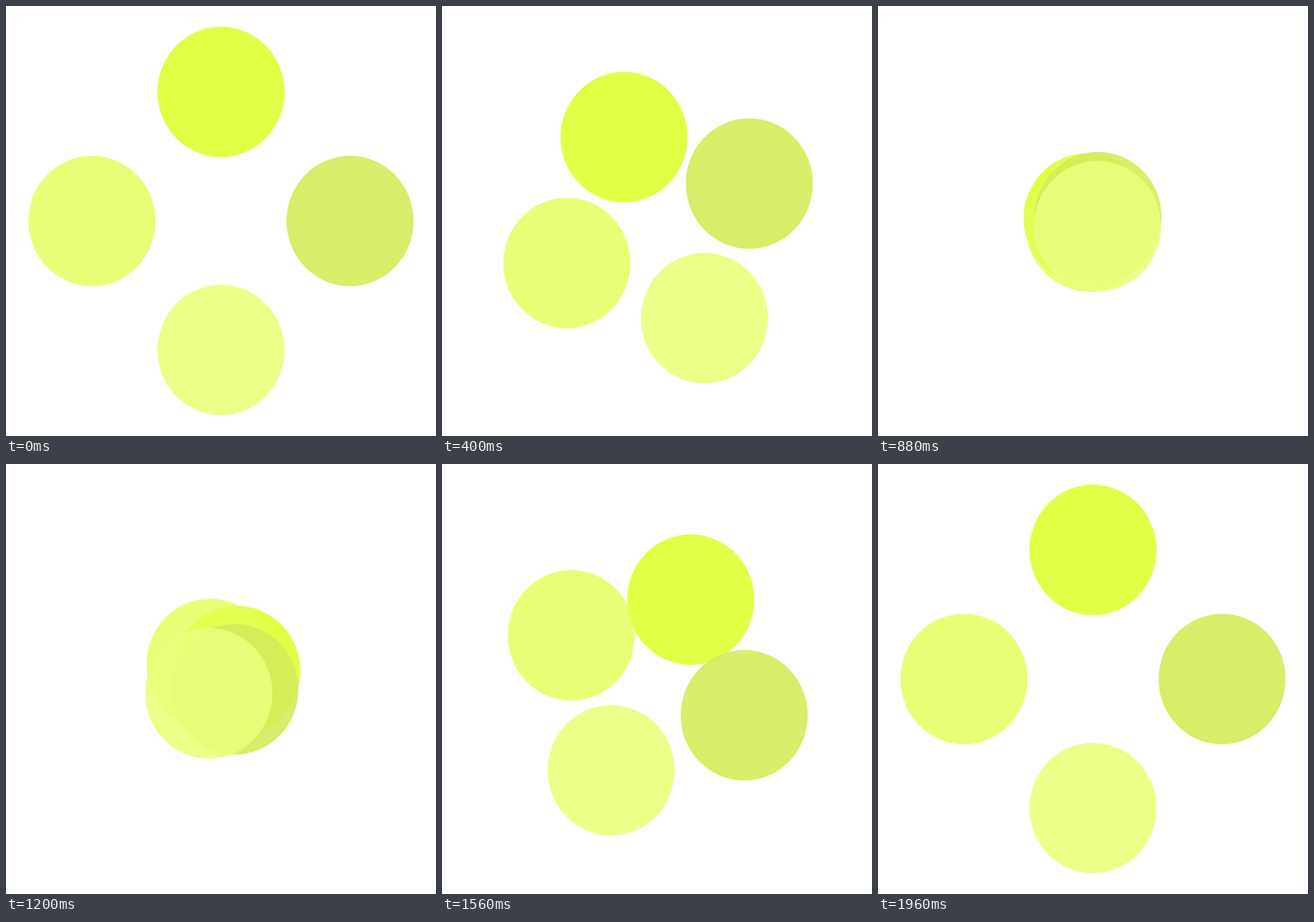
An HTML page that plays this animation: 748 px wide and 748 px high, repeating every 2 s.

```html
<!DOCTYPE html>
<html lang="en">
<head>
<meta charset="utf-8">
<title>Four gathering circles</title>
<style>
  html, body { margin: 0; width: 100%; height: 100%; overflow: hidden; background: #fff; }
  svg { display: block; width: 100vw; height: 100vh; }
</style>
</head>
<body>
<svg viewBox="0 0 748 748"></svg>
<script>
const NS = 'http://www.w3.org/2000/svg';
const LOOP = 2000, STEP = 40, MEET = 1000, END = 1965;
const CENTRE = 374, REACH = 224.5;

// Arcs leave the centre; control points are [along the arm, sideways].
// p2In and p2Out bend the way in and the way out. Listed back to front.
const circles = [
  { color: 'rgb(225,255,69)', angle: -90, p1: [40, 105], p2In: [145, 82], p2Out: [145, 78] },
  { color: 'rgba(225,255,84,.8)', angle: 180, p1: [58, 95], p2In: [172, 118], p2Out: [172, 118] },
  { color: 'rgba(212,236,89,.9)', angle: 0, p1: [75, 60], p2In: [190, 113], p2Out: [190, 106] },
  { color: 'rgba(233,255,125,.9)', angle: 90, p1: [75, 68], p2In: [200, 150], p2Out: [200, 140] },
];

function make(tag, attrs) {
  const el = document.createElementNS(NS, tag);
  for (const key in attrs) el.setAttribute(key, attrs[key]);
  return el;
}

function arc(angle, p1, p2, side) {
  const a = angle * Math.PI / 180, c = Math.cos(a), s = Math.sin(a);
  const place = ([u, v]) =>
    `${CENTRE + u * c + side * v * s} ${CENTRE + u * s - side * v * c}`;
  const d = `M${place([0, 0])}C${[p1, p2, [REACH, 0]].map(place)}`;
  const path = make('path', { d });
  const length = path.getTotalLength();
  return part => path.getPointAtLength(part * length);
}

const svg = document.querySelector('svg');
for (const o of circles) {
  o.wayIn = arc(o.angle, o.p1, o.p2In, 1);
  o.wayOut = arc(o.angle, o.p1, o.p2Out, -1);
  o.el = svg.appendChild(make('ellipse', { rx: 110.5, ry: 113.5, fill: o.color }));
}

const ease = x => x * x * (3 - 2 * x);

function draw(now) {
  const t = Math.floor(now % LOOP / STEP) * STEP;
  const inward = t < MEET;
  const part = ease(inward ? 1 - t / MEET : (t - MEET) / (END - MEET));
  for (const o of circles) {
    const { x, y } = (inward ? o.wayIn : o.wayOut)(part);
    o.el.setAttribute('cx', x);
    o.el.setAttribute('cy', y);
  }
}

const start = performance.now();
function tick() {
  draw(performance.now() - start);
  requestAnimationFrame(tick);
}
tick();
</script>
</body>
</html>
```
